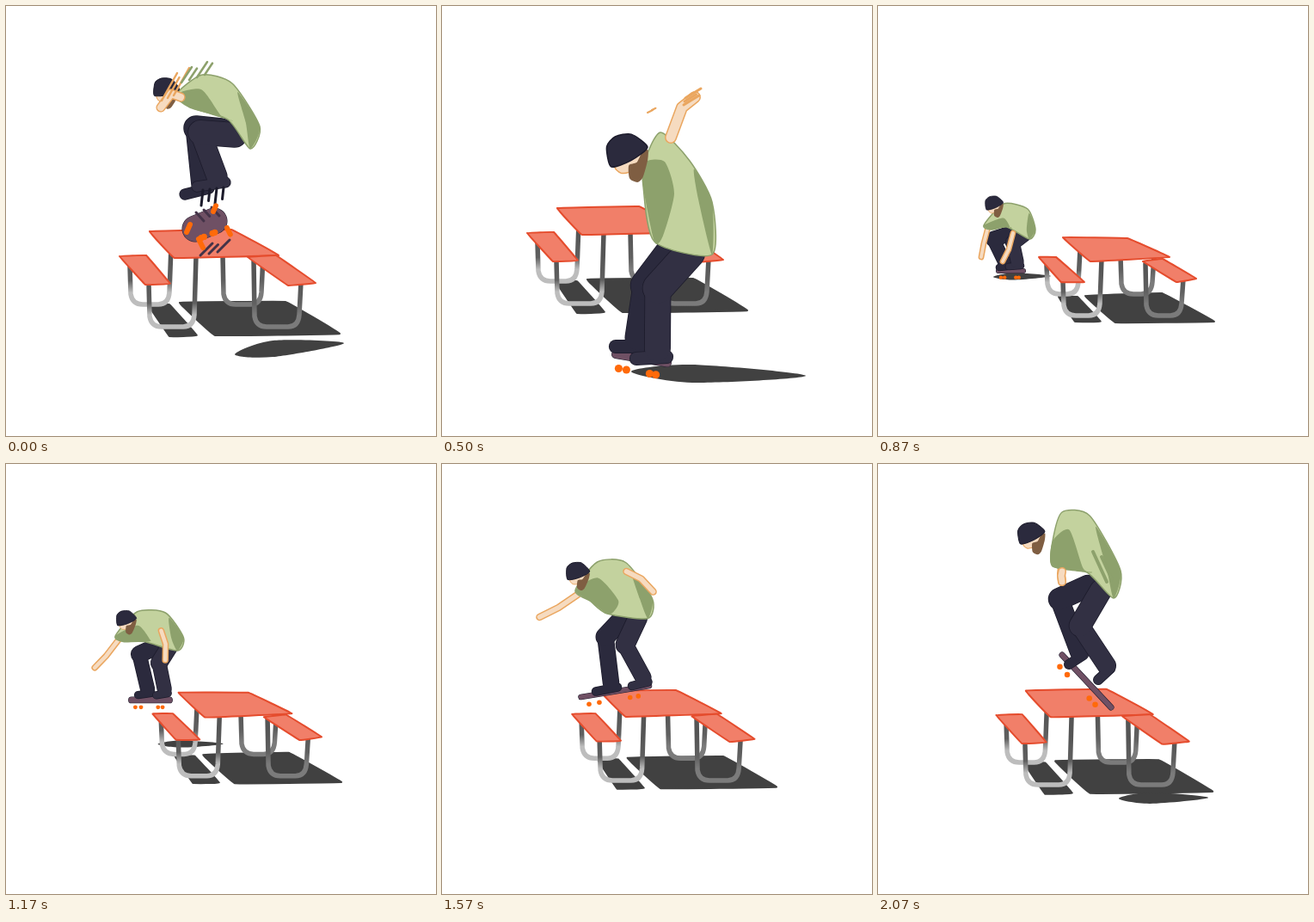
Recreate the animation shown at these times as an HTML page with a canvas. Size 500x500 px, loop 2.1 s.

```html
<!DOCTYPE html>
<html lang="en">
<head>
<meta charset="utf-8">
<title>Skater and picnic table</title>
<style>
html, body { margin: 0; width: 100%; height: 100%; overflow: hidden; background: #fff }
canvas { display: block; width: 100vw; height: 100vh }
</style>
</head>
<body>
<canvas id="stage" width="500" height="500"></canvas>
<script>
(() => {
const ctx = document.getElementById('stage').getContext('2d');
ctx.lineCap = ctx.lineJoin = 'round';

const DARK = '#414141', NAVY = '#2b2a3d', INK = '#1c1b2b', LEAF = '#8da16c',
  LIME = '#c3d29e', SKIN = '#f6dbc0', TAN = '#eaa65f', RED = '#e54c2d',
  CORAL = '#f17f69', PLUM = '#6f5064', FIRE = '#ff6a0a', BROWN = '#7f5e42';

// table: turn, dx, dy. size: leg width. head: x, y, tilt, scale.
// shirt: front, neck, back, low back, rear hem, front hem, chest.
// legs: hip, knee, heel, toe. arms: shoulder, elbow, hand.
// board and shadow: two ends and a thickness. zoom: scale, dx, dy.
const air = {
  table: [0, 0, 0], size: 28, head: [187, 101, -12, .62], zoom: [1, 0, 0],
  shirt: [198, 103, 228, 80, 263, 90, 295, 140, 284, 166, 258, 132, 214, 118],
  near: [266, 150, 226, 147, 255, 205, 222, 210], far: [250, 145, 221, 142, 236, 212, 208, 219],
  armA: [206, 107, 207, 107, 208, 107], armB: [203, 106, 192, 102, 180, 118],
  board: [220, 259, 242, 250, 30], shadow: [266, 405, 393, 392, 12]
};
const land = {
  table: [0, -14, -12], size: 32, head: [204, 153, -33, .72], zoom: [1, 0, 0],
  shirt: [229, 150, 235, 129, 266, 148, 300, 222, 298, 247, 249, 240, 238, 190],
  near: [274, 246, 251, 292, 262, 384, 238, 389], far: [268, 246, 248, 295, 248, 387, 230, 391],
  armA: [240, 150, 241, 150, 242, 150], armB: [233, 135, 207, 134, 163, 164],
  board: [227, 402, 260, 396, 15], shadow: [225, 427, 370, 400, 14]
};
const roll = {
  table: [0, -33, -27], size: 35, head: [218, 176, -27, 1], zoom: [1, 0, 0],
  shirt: [235, 182, 254, 147, 288, 180, 314, 228, 314, 289, 247, 274, 234, 210],
  near: [288, 287, 251, 328, 261, 408, 226, 410], far: [268, 284, 237, 325, 239, 396, 202, 396],
  armA: [250, 180, 251, 180, 252, 180], armB: [266, 153, 279, 118, 294, 106],
  board: [202, 405, 262, 415, 9], shadow: [220, 425, 423, 430, 13]
};
const crouch = {
  table: [1, 0, 0], size: 17, head: [136, 233, -22, .44], zoom: [1, 0, 0],
  shirt: [123, 255, 146, 230, 174, 236, 183, 260, 176, 271, 150, 257, 132, 260],
  near: [170, 265, 157, 275, 166, 302, 152, 303], far: [162, 262, 134, 271, 150, 303, 141, 304],
  armA: [128, 257, 123, 276, 120, 292], armB: [157, 264, 152, 283, 145, 297],
  board: [140, 308, 169, 308, 5], shadow: [134, 315, 201, 314, 5]
};
const ollie = {
  table: [.5, 0, -2], size: 20, head: [144, 151, -18, .52], zoom: [1, 0, 0],
  shirt: [130, 163, 157, 133, 193, 131, 222, 163, 215, 181, 168, 173, 139, 171],
  near: [204, 176, 192, 202, 203, 243, 190, 246], far: [195, 174, 169, 188, 182, 242, 162, 245],
  armA: [133, 169, 112, 188, 92, 200], armB: [196, 147, 208, 160, 212, 182],
  board: [150, 252, 204, 252, 8], shadow: [205, 333, 287, 333, 5]
};
const ride = {
  table: [.2, 0, 1], size: 23, head: [174, 109, -20, .62], zoom: [1, 0, 0],
  shirt: [180, 131, 204, 95, 234, 98, 267, 150, 264, 178, 216, 175, 206, 148],
  near: [252, 180, 234, 218, 276, 264, 252, 270], far: [230, 180, 211, 214, 226, 277, 196, 284],
  armA: [182, 135, 159, 146, 135, 156], armB: [233, 103, 255, 107, 279, 115],
  board: [173, 290, 278, 264, 3], shadow: [250, 361, 340, 366, 5]
};
const pop = {
  table: [.08, 1, 1], size: 25, head: [180, 86, -26, .66], zoom: [1, 0, 0],
  shirt: [203, 90, 214, 56, 246, 60, 282, 124, 274, 156, 243, 126, 203, 119],
  near: [259, 147, 235, 188, 270, 238, 256, 251], far: [244, 142, 211, 157, 239, 222, 222, 233],
  armA: [214, 118, 213, 128, 214, 137], armB: [214, 125, 213, 130, 214, 137],
  board: [214, 222, 271, 283, 6], shadow: [280, 389, 384, 388, 8]
};

// The scene cuts between steps 6 and 7
const keys = [
  [0, air], [3, land], [5, roll],
  [6, { ...roll, table: [0, -44, -33], zoom: [1.05, -11.5, -19] }],
  [7, { ...crouch, table: [1.15, 2, -2], zoom: [.92, -13, 21] }],
  [9, crouch], [14, ollie], [18, ride], [21, pop], [22, air]
];

// Each table piece as seen from the far left and from the near right
const furniture = {
  slabs: [
    [[165, 347, 190, 347, 222, 383, 190, 384], [210, 338, 232, 338, 259, 367, 229, 367]],
    [[202, 345, 325, 344, 388, 381, 243, 383], [241, 337, 330, 334, 391, 367, 276, 368]]
  ],
  boards: [
    [[167, 262, 262, 260, 317, 290, 196, 293], [215, 269, 290, 270, 339, 292, 247, 297]],
    [[132, 291, 163, 290, 191, 323, 162, 324], [187, 292, 207, 292, 240, 321, 213, 321]],
    [[281, 292, 314, 290, 360, 322, 328, 325], [308, 297, 331, 294, 370, 317, 347, 321]]
  ],
  // left x, top y, right x, top y, floor
  posts: [
    [[252, 290, 297, 290, 347], [282, 291, 319, 291, 335]],
    [[144, 302, 190, 280, 347], [196, 302, 233, 283, 335]],
    [[288, 295, 341, 321, 373], [311, 300, 353, 317, 360]],
    [[166, 323, 219, 291, 373], [215, 320, 258, 294, 360]]
  ]
};

const hat = [-24, 0, -18, -23, -4, -29, 14, -23, 24, -1, 0, 4];
const face = [-19, 1, 15, 1, 10, 18, -5, 16, -17, 12];
const beard = [-5, 8, 5, 9, 15, 2, 23, 2, 17, 13, 3, 28, -5, 30, -11, 22];

function mix(a, b, u) {
  if (typeof a === 'number') return a + (b - a) * u;
  if (Array.isArray(a)) return a.map((v, i) => mix(v, b[i], u));
  return Object.fromEntries(Object.keys(a).map(k => [k, mix(a[k], b[k], u)]));
}

function shape(p, fill, line, width = 1.5, bend = .12) {
  const n = p.length / 2, at = i => [p[(i + n) % n * 2], p[(i + n) % n * 2 + 1]];
  ctx.beginPath();
  ctx.moveTo(...at(0));
  for (let i = 0; i < n; i++) {
    const [w, a, b, c] = [-1, 0, 1, 2].map(d => at(i + d));
    ctx.bezierCurveTo(a[0] + (b[0] - w[0]) * bend, a[1] + (b[1] - w[1]) * bend,
      b[0] - (c[0] - a[0]) * bend, b[1] - (c[1] - a[1]) * bend, ...b);
  }
  ctx.fillStyle = fill;
  ctx.fill();
  if (!line) return;
  ctx.strokeStyle = line;
  ctx.lineWidth = width;
  ctx.stroke();
}

function stroke(p, color, width) {
  ctx.strokeStyle = color;
  ctx.lineWidth = width;
  ctx.beginPath();
  for (let i = 0; i < p.length; i += 2) ctx.lineTo(p[i], p[i + 1]);
  ctx.stroke();
}

function spindle([x1, y1, x2, y2, thick], color) {
  const x = x1 + (x2 - x1) * .35, y = (y1 + y2) / 2;
  shape([x1, y1, x, y - thick * .8, x2, y2, x, y + thick * .8], color, null, 0, .15);
}

function post([x1, y1, x2, y2, floor], light) {
  const paint = ctx.createLinearGradient(0, floor - 55, 0, floor);
  paint.addColorStop(0, '#555');
  paint.addColorStop(.5, '#606060');
  paint.addColorStop(.75, light);
  ctx.strokeStyle = paint;
  ctx.lineWidth = 5.5;
  ctx.beginPath();
  ctx.moveTo(x1, y1);
  ctx.lineTo(x1 + 1, floor - 12);
  ctx.quadraticCurveTo(x1 + 3, floor, x1 + 15, floor);
  ctx.lineTo(x2 - 13, floor);
  ctx.quadraticCurveTo(x2 - 1, floor, x2, floor - 14);
  ctx.lineTo(x2 + 2, y2);
  ctx.stroke();
}

function drawTable([turn, dx, dy]) {
  const seen = ([a, b]) => mix(a, b, turn);
  ctx.save();
  ctx.translate(dx, dy);
  for (const s of furniture.slabs) shape(seen(s), DARK, DARK, 2, .015);
  furniture.posts.forEach((p, i) => post(seen(p), i % 2 ? '#bdbdbd' : '#7b7b7b'));
  for (const b of furniture.boards) shape(seen(b), CORAL, RED, 2, .015);
  ctx.restore();
}

function leg([hx, hy, kx, ky, x1, y1, x2, y2], width, color) {
  const ankle = [mix(x1, x2, .3), mix(y1, y2, .3) - width * .3];
  for (const [tone, grow] of [[INK, 1.5], [color, 0]]) {
    stroke([x1, y1, x2, y2], tone, width * .42 + grow);
    stroke([kx, ky, ...ankle], tone, width * .84 + grow);
    stroke([hx, hy, kx, ky], tone, width + grow);
  }
}

function arm(p, width) {
  stroke(p, TAN, width);
  stroke(p, SKIN, width - 3);
}

function drawHead([x, y, tilt, scale]) {
  ctx.save();
  ctx.translate(x, y);
  ctx.rotate(tilt * Math.PI / 180);
  ctx.scale(scale, scale);
  shape(face, SKIN, TAN);
  shape(beard, BROWN);
  shape(hat, NAVY, INK);
  ctx.restore();
}

function drawShirt(p) {
  const at = i => p.slice(i * 2, i * 2 + 2), between = (i, j, u) => mix(at(i), at(j), u);
  shape(p, LIME, LEAF);
  shape([at(0), between(0, 2, .45), between(6, 3, .45), between(5, 3, .15), at(5), at(6)].flat(), LEAF);
  shape([between(2, 3, .2), at(3), at(4), between(3, 6, .2)].flat(), LEAF);
}

function drawBoard([x1, y1, x2, y2, thick], size) {
  stroke([x1, y1, x2, y2], INK, thick + 1);
  stroke([x1, y1, x2, y2], PLUM, thick);
  const length = Math.hypot(x2 - x1, y2 - y1), drop = size * .45 / length;
  ctx.fillStyle = FIRE;
  for (const u of [.1, .25, .7, .82]) {
    ctx.beginPath();
    ctx.arc(mix(x1, x2, u) - (y2 - y1) * drop, mix(y1, y2, u) + (x2 - x1) * drop, size * .13, 0, 7);
    ctx.fill();
  }
}

// Rows of short smear strokes: start, direction, count, spacing
const smears = new Map([
  [air, [
    [TAN, 2.5, 181, 110, 18, -32, 3, 7, -3], [LEAF, 2.5, 204, 89, 12, -18, 4, 9, -3],
    [INK, 3, 229, 214, -2, 18, 4, 8, -1], ['#443348', 3, 221, 240, 9, 10, 3, 9, -3],
    ['#443348', 3, 226, 290, 14, -14, 3, 10, -2], [FIRE, 6, 210, 263, 4, -9, 2, 31, -24],
    [FIRE, 6, 224, 271, 5, 10, 2, 33, -13]]],
  [land, [
    ['#34333f', 2.5, 204, 338, 20, 46, 3, 8, 4], [PLUM, 2.5, 206, 382, 16, 16, 2, 2, -22],
    [FIRE, 6, 216, 410, 7, 12, 2, 36, -7]]],
  [roll, [
    [TAN, 3, 281, 115, 18, -11, 3, 1, -4], [TAN, 2, 239, 124, 6, -3, 2, 5, -3]]],
  [ollie, [[FIRE, 3, 174, 274, 9, -9, 3, 9, -3], [FIRE, 2, 488, 268, 0, 1, 1, 0, 0]]],
  [ride, [[FIRE, 1.5, 94, 193, 0, 1, 1, 0, 0]]],
  [pop, [[LEAF, 4, 250, 102, 16, 35, 2, 10, 6]]]
]);

function drawSmears(pose) {
  for (const [color, width, x, y, dx, dy, count, sx, sy] of smears.get(pose) || []) {
    for (let i = 0; i < count; i++) {
      const a = x + sx * i, b = y + sy * i, reach = 1 - i % 2 * .25;
      stroke([a, b, a + dx * reach, b + dy * reach], color, width);
    }
  }
}

function render(step) {
  const i = keys.findLastIndex(([at]) => at <= step);
  const [start, a] = keys[i], [end, b] = keys[i + 1];
  const pose = mix(a, b, (step - start) / (end - start));
  const [scale, dx, dy] = pose.zoom, width = pose.size;
  const zoom = () => ctx.setTransform(scale, 0, 0, scale, dx, dy);

  ctx.resetTransform();
  ctx.fillStyle = '#fff';
  ctx.fillRect(0, 0, 500, 500);
  zoom();
  spindle(pose.shadow, DARK);
  ctx.resetTransform();
  drawTable(pose.table);
  zoom();
  drawBoard(pose.board, width);
  leg(pose.far, width, NAVY);
  leg(pose.near, width, '#323043');
  arm(pose.armA, width * .4);
  drawShirt(pose.shirt);
  drawHead(pose.head);
  arm(pose.armB, width * .4);
  if (step === start) drawSmears(a);
}

function tick() {
  const t = performance.now() % 2100;
  render(t < 670 ? Math.floor(t / 100) : 7 + Math.floor((t - 670) / 100));
  requestAnimationFrame(tick);
}
tick();
})();
</script>
</body>
</html>
```
